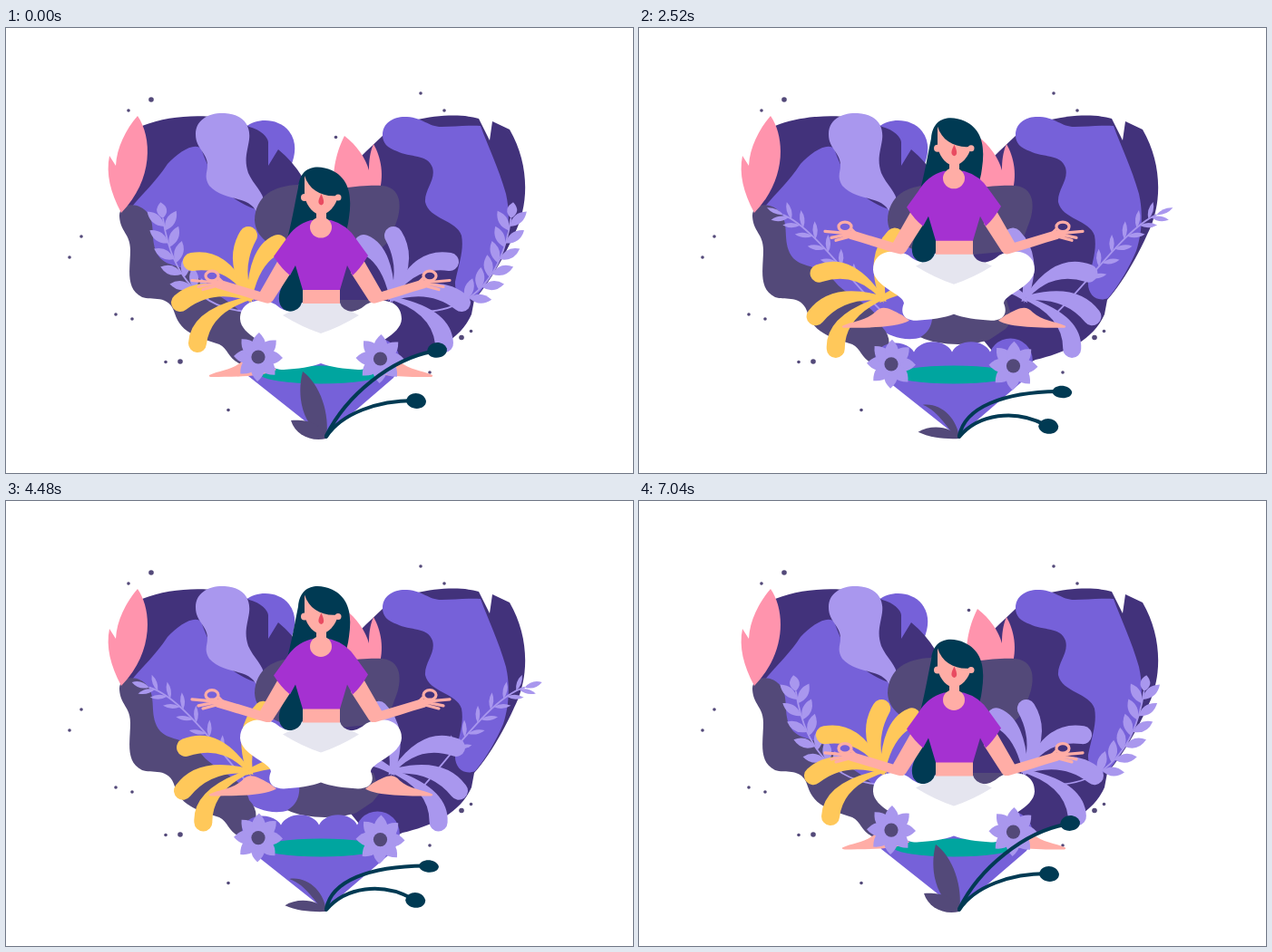
Animation, 691 px wide and 491 px high, one loop 7080 ms. Source, as an HTML page:

```html
<!DOCTYPE html>
<html>
<head>
<meta charset="utf-8">
<style>
html, body { margin: 0; width: 100%; height: 100%; overflow: hidden; background: #fff }
svg { display: block; width: 100vw; height: 100vh }
.dark { fill: #42327b } .mid { fill: #7661d9 } .light { fill: #a997ee } .gray { fill: #534979 }
.pink { fill: #ff94ad } .navy { fill: #003a53 } .skin { fill: #ffada6 } .gold { fill: #ffc85a }
.stem { fill: none; stroke: #003a53; stroke-width: 4; stroke-linecap: round }
.twig { fill: none; stroke: #a997ee; stroke-width: 1.8 }
.finger { fill: none; stroke: #ffada6; stroke-width: 3.2; stroke-linecap: round }
</style>
</head>
<body>
<svg viewBox="0 0 691 491">
  <defs>
    <g id="limb">
      <path class="skin" d="M300 256L280 291L240 279C235 277 229 278 226 281L232 287C250 292 270 299 285 303Q291 305 294 301L314 270Z"/>
      <ellipse class="finger" cx="227" cy="273.500" rx="7" ry="5.300"/>
      <path class="finger" d="M205 278.500L233 281M212 285.500L234 281M217 288.500L234 284M234 276L239 281"/>
    </g>
    <path id="foot" class="skin" d="M224 383C235 378 250 377 260 368C268 359 275 363 290 371L298 377C285 385 250 385 227 385Q223 385 224 383Z"/>
    <g id="flower">
      <g id="rays" class="light"></g>
      <circle class="gray" r="7.600"/>
    </g>
  </defs>

  <path class="mid" d="M264 109C277 99 300 99 312 114C321 126 319 140 314 152L290 165Z"/>
  <path class="dark" d="M150 108C190 92 245 95 268 109C281 112 289 121 289 126L289 152L300 134Q316 147 327 165L313 190L290 215L200 230L128 198Z"/>
  <path class="dark" d="M345 215C350 180 382 150 416 118C440 98 495 92 521 100L533 124L536 103L555 112C577 150 577 195 560 228C548 255 530 285 516 300L513 316C500 345 470 358 437 366Q415 378 402 372L380 345L340 340L320 300Z"/>
  <path class="mid" d="M138 198C150 183 165 170 178 150C190 137 207 126 215 133C225 160 235 185 275 200C285 225 300 240 340 250L330 300C322 315 326 336 312 341C295 347 275 340 266 332L170 290L155 220Z"/>
  <path class="gray" d="M125 208C124 193 146 190 157 205C166 220 157 238 170 254C182 266 200 260 216 280C228 296 262 305 268 330Q284 346 266 372C245 370 247 355 235 349C215 342 193 338 186 315C180 293 160 301 150 297C131 288 137 265 137 245C137 227 126 225 125 208Z"/>
  <path class="light" d="M209 117C209 101 224 93 241 94C261 95 270 107 268 123C266 137 262 145 267 160C273 174 287 184 284 196L276 203C268 184 240 192 224 174C215 160 228 155 218 139C212 130 209 126 209 117Z"/>
  <path class="pink" d="M145 97C161 120 163 167 127 204C115 181 110 161 114 141L121 152C122 132 132 112 145 97Z"/>
  <path class="mid" d="M415 118C415 104 428 97 442 98C460 99 465 109 480 109C495 109 510 107 523 108C531 130 543 155 551 183C556 205 554 228 548 246C540 265 528 285 517 298C505 303 494 295 495 280C499 260 505 245 502 229C497 212 466 211 462 192C461 178 474 168 470 154C465 139 445 143 431 136C420 132 415 127 415 118Z"/>
  <path class="pink" d="M373 119C365 135 359 155 361 185L410 185C418 163 413 142 405 128C401 137 400 147 400 157C396 143 387 130 373 119Z"/>
  <path class="gray" d="M274 212C275 185 295 174 322 173L345 185C360 177 390 173 415 174C440 177 435 205 428 220C422 240 413 245 400 247L368 250L320 250C300 245 275 235 274 212Z"/>
  <path class="gray" d="M322 300C325 320 324 333 310 341C330 351 366 351 386 344L404 332L412 322L405 300Z"/>

  <g id="ferns"></g>
  <g id="plants"></g>
  <g id="dots" class="gray"></g>

  <path class="mid" d="M262 370A22 16 0 0 1 303 357.500A22 16 0 0 1 345 357.500A22 16 0 0 1 387 357.500A22 22 0 0 1 432 376L427 386L362 442L352 453L340 442L267 384Z"/>
  <ellipse cx="347" cy="382.500" rx="66" ry="10" fill="#00a59f"/>

  <g id="woman">
    <path class="navy" d="M322 176C324 152 343 150 359 157C380 167 381 188 378 209C376 226 370 238 365 240L330 245L327 300C324 316 308 317 302 305C297 292 309 277 316 262L308 240C315 215 318 195 322 176Z"/>
    <use href="#foot"/><use href="#foot" transform="matrix(-1 0 0 1 694 0)"/>
    <path fill="#fff" d="M327 303Q325 311 316 313Q306 313 297 305C283 297 258 299 258 321C259 340 292 348 292 358C287 370 293 377 306 377C322 376 336 374 347 370C358 374 372 376 388 377C401 377 407 370 402 358C402 348 435 340 436 321C436 299 411 297 397 305Q388 313 378 313Q369 311 367 303Z"/>
    <path fill="#e5e5ef" d="M326 303L368 303Q370 311 381 313L389 317Q368 330 347 337Q326 330 305 317L313 313Q324 311 326 303Z"/>
    <path class="skin" d="M327 286H368V304H327Z"/>
    <use href="#limb"/><use href="#limb" transform="matrix(-1 0 0 1 694 0)"/>
    <path fill="#a531d1" d="M336 212Q318 217 308 234L295 252Q303 265 313 273L319 262L327 289H368L376 262L382 273Q391 265 399 251L386 233Q376 217 358 212Z"/>
    <ellipse class="skin" cx="347" cy="220" rx="12" ry="11.500"/>
    <path class="skin" d="M342 198H353V216H342Z"/>
    <circle class="skin" cx="329" cy="187" r="4"/><circle class="skin" cx="366" cy="187" r="3.500"/>
    <path class="skin" d="M329 163V186C332 198 340 206 347 206C355 206 364 196 366 185C349 187 334 179 329 163Z"/>
    <path fill="#e94b61" d="M347.500 183C350 189 352 194 347.500 195.500C342 194 345 188 347.500 183Z"/>
  </g>

  <g id="flowers"><use href="#flower" x="278" y="363"/><use href="#flower" x="412.500" y="365"/></g>
  <g id="sprouts"></g>
</svg>
<script>
const $ = id => document.getElementById(id);
const PERIOD = 7080, LIFT = 69.5;
const num = /-?[\d.]+/g;

// Eased there-and-back swing: 0 at the start, 1 after `half` ms.
const swing = (t, half) => {
  const u = 1 - Math.abs(1 - t / half);
  return u * u * (3 - 2 * u);
};
const mix = (a, b, s) => {
  const to = b.match(num);
  let i = 0;
  return a.replace(num, v => +v + (to[i++] - v) * s);
};
const path = (cls, d, extra = '') => `<path class="${cls}" d="${d}" ${extra}/>`;
const mirror = (axis, body) => `<g transform="matrix(-1 0 0 1 ${axis * 2} 0)">${body}</g>`;
const lens = (l, w) => `M0 0Q${l / 2} ${-w} ${l} 0Q${l / 2} ${w} 0 0Z`;

// tip x, y, bend x, y, droop in degrees
const root = [268, 298];
const petals = [
  [205, 258, 246, 252, -14], [192, 303, 222, 278, -15], [211, 348, 214, 312, -8],
  [267, 229, 249, 260, 16], [300, 238, 273, 250, 70]
];

function petal([x, y, bx, by, droop], cls, s, limit) {
  const [rx, ry] = root, r = 10, d = Math.hypot(x - bx, y - by);
  const nx = (by - y) / d * r, ny = (x - bx) / d * r;
  const side = k => `${bx + nx * k} ${by + ny * k}`;
  return path(cls,
    `M${rx - nx * .6} ${ry - ny * .6}Q${side(-1.1)} ${x - nx} ${y - ny}` +
    `A${r} ${r} 0 0 1 ${x + nx} ${y + ny}Q${side(1.1)} ${rx + nx * .6} ${ry + ny * .6}Z`,
    `transform="rotate(${Math.min(droop, limit) * s} ${rx} ${ry})"`);
}
const plant = (cls, s, limit) => petals.map(p => petal(p, cls, s, limit)).join('');

function fern(s) {
  const d = mix('M268 313C205 310 180 260 173 210', 'M268 313C240 270 195 208 155 205', s);
  const [x0, y0, x1, y1, x2, y2, x3, y3] = d.match(num).map(Number);
  const bez = (a, b, c, e, t) => {
    const u = 1 - t;
    return u * u * u * a + 3 * u * u * t * b + 3 * u * t * t * c + t * t * t * e;
  };
  const at = t => [bez(x0, x1, x2, x3, t), bez(y0, y1, y2, y3, t)];
  const leaf = (t, turn, l, w) => {
    const [x, y] = at(t), [px, py] = at(t - .02);
    const a = Math.atan2(y - py, x - px) * 180 / Math.PI + turn;
    return path('light', lens(l, w), `transform="translate(${x} ${y}) rotate(${a})"`);
  };
  let out = path('twig', d) + leaf(1, 0, 18 + 2 * s, 1 + 10 * Math.abs(1 - 1.8 * s));
  for (let i = 0; i < 6; i++) {
    const t = .94 - i * .125, l = 25 - 7 * s, w = 10 - 6 * s;
    out += leaf(t, -38, l, w) + leaf(t - .03, 42, l, w);
  }
  return out;
}

function sprouts(s) {
  const pod = (x, y, ry, a) => path('navy',
    `M${x - 11} ${y}C${x - 9} ${y - ry * 1.4} ${x + 8} ${y - ry * 1.4} ${x + 11} ${y}` +
    `C${x + 11} ${y + ry * 1.4} ${x - 9} ${y + ry * 1.4} ${x - 11} ${y}Z`,
    `transform="rotate(${a} ${x} ${y})"`);
  return path('gray', mix('M353 453C326 440 320 405 327 379C346 393 357 425 353 453Z',
                          'M353 453C343 445 335 428 309 425C330 418 350 433 353 453Z', s)) +
    path('gray', mix('M353 453C336 457 319 449 314 433C332 432 349 436 353 453Z',
                     'M353 453C338 453 321 453 306 449C319 438 345 440 353 453Z', s)) +
    path('stem', mix('M353 450C375 405 425 365 470 357', 'M353 450C355 422 395 411 460 412', s)) +
    path('stem', mix('M353 451C370 425 410 411 450 411', 'M353 451C375 426 415 422 448 445', s)) +
    pod(475 - 11 * s, 355.5 + 57.5 * s, 8 - 2 * s, -10 + 14 * s) +
    pod(452 - s, 411.5 + 35 * s, 8, 0);
}

for (let i = 0; i < 8; i++)
  $('rays').innerHTML += path('light', lens(27, 15), `transform="rotate(${i * 45 + 2})"`);

$('dots').innerHTML = [
  [160, 79, 2.8], [135, 91], [457, 72], [483, 91], [363.5, 120.5], [83, 230], [70, 253], [121, 316],
  [139, 321], [176, 368.5], [192, 368, 2.8], [245, 421.5], [502, 341.5, 2.8], [512.5, 334.5], [467, 380]
].map(([x, y, r = 1.8]) => `<circle cx="${x}" cy="${y}" r="${r}"/>`).join('');

function draw(now) {
  const t = now % PERIOD;
  const s = swing(t, 3620);
  const frond = fern(s);
  $('ferns').innerHTML = frond + mirror(364.7, frond);
  $('plants').innerHTML = plant('gold', s, 70) + mirror(347, plant('light', s, 60));
  $('woman').setAttribute('transform', `translate(0 ${-LIFT * s})`);
  $('flowers').setAttribute('transform', `translate(0 ${10 * s})`);
  $('sprouts').innerHTML = sprouts(swing(t, PERIOD / 2));
}

const start = performance.now();
(function tick() {
  draw(performance.now() - start);
  requestAnimationFrame(tick);
})();
</script>
</body>
</html>
```
